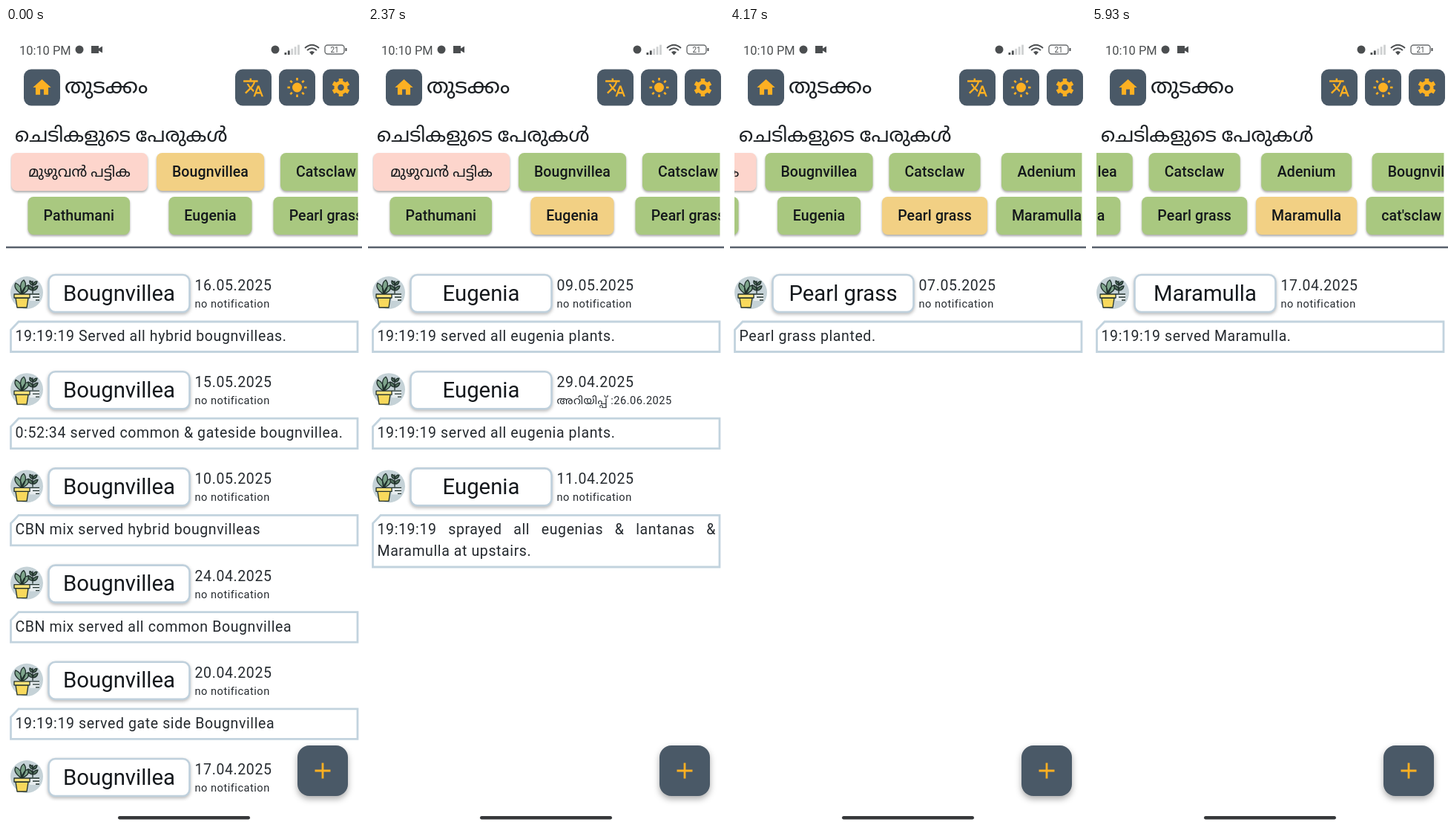
Animation of 480 by 1072 pixels, one loop 6.01 s. Source, as an HTML page:

```html
<!DOCTYPE html>
<html lang="ml">
<head>
<meta charset="utf-8">
<style>
  html, body { margin: 0; width: 100%; height: 100%; overflow: hidden; background: #fff; }
  svg { display: block; width: 480px; height: 1072px; font-family: Roboto, "Noto Sans Malayalam", "Noto Sans", sans-serif; }
  .ml { font-size: 29.3px; fill: #1c2024; }
  .chip rect { filter: drop-shadow(0 2px 1.5px #0005); }
  .chip text { font-size: 19.5px; font-weight: 500; letter-spacing: .12px; text-anchor: middle; fill: #14181b; }
  .name { font-size: 29.3px; text-anchor: middle; fill: #14181c; }
  .date { font-size: 19.5px; letter-spacing: .61px; fill: #262b30; }
  .alert { font-size: 14.65px; letter-spacing: .49px; fill: #262b30; }
  .note { font-size: 19.5px; letter-spacing: .61px; line-height: 29.3px; text-align: justify; color: #24292e; }
  .card { fill: #fff; stroke: #bfd0dc; stroke-width: 2.6; filter: drop-shadow(0 2px 2px #0004); }
  .frame { fill: #fff; stroke: #c2d3de; stroke-width: 2.8; }
  .icon { fill: #fdb022; stroke: none; }
  .line { fill: none; stroke: #fdb022; }
</style>
</head>
<body>
<svg id="stage" viewBox="0 0 480 1072">
  <defs>
    <clipPath id="strip"><rect x="6" y="160" width="468.5" height="126"/></clipPath>
    <clipPath id="list"><rect y="300" width="480" height="740"/></clipPath>
    <g id="plant" stroke="#20302c" stroke-width="1.3" stroke-linejoin="round">
      <circle r="22" fill="#c5d2d7" stroke="none"/>
      <path d="M4 2H17V11H4Z" fill="#e6ecee" stroke="none"/>
      <path d="M4 2H17M8 6H17M12 10H17" fill="none"/>
      <path d="M-7 2Q-19-6-15-13Q-6-9-7 2Q-11-13-4-17Q2-10-7 2Q-4-9 2-10Q5-3-7 2Z" fill="#7fa58c"/>
      <path d="M8 1V-16M8-3Q1-4 2-10Q8-9 8-3Q9-9 15-9Q14-3 8-3M8-10Q3-11 4-16Q8-15 8-10Q10-16 14-15Q13-10 8-10" fill="#53705f"/>
      <path d="M-15 7H2L0 20H-13Z" fill="#f8d95c"/>
      <path d="M-17 2H4V7H-17Z" fill="#fbe27a"/>
    </g>
  </defs>
  <g id="scene"></g>
</svg>
<script>
const LOOP = 6010;
const PITCH = 130.2;
const GREEN = '#a9c880', YELLOW = '#f2d084', PINK = '#fdd5cc', SLATE = '#4a5967';

// row, left edge, width, label
const chips = [
  [0, 7, 184, 'മുഴുവൻ പട്ടിക'], [0, 203, 145, 'Bougnvillea'], [0, 370, 123, 'Catsclaw'],
  [0, 521.5, 122, 'Adenium'], [0, 671, 145, 'Bougnvillea'],
  [1, 29.5, 137.5, 'Pathumani'], [1, 219.5, 112, 'Eugenia'], [1, 360.5, 142, 'Pearl grass'],
  [1, 514.5, 136, 'Maramulla'], [1, 663, 122, "cat'sclaw"],
];

const views = [
  { from: 0, chip: 1, items: [
    ['16.05.2025', '19:19:19 Served all hybrid bougnvilleas.'],
    ['15.05.2025', '0:52:34 served common &amp; gateside bougnvillea.'],
    ['10.05.2025', 'CBN mix served hybrid bougnvilleas'],
    ['24.04.2025', 'CBN mix served all common Bougnvillea'],
    ['20.04.2025', '19:19:19 served gate side Bougnvillea'],
    ['17.04.2025', ''],
  ] },
  { from: 1730, chip: 6, items: [
    ['09.05.2025', '19:19:19 served all eugenia plants.'],
    ['29.04.2025', '19:19:19 served all eugenia plants.', 'അറിയിപ്പ് :26.06.2025'],
    ['11.04.2025', '19:19:19 sprayed all eugenias &amp; lantanas &amp; Maramulla at upstairs.'],
  ] },
  { from: 3810, chip: 7, items: [['07.05.2025', 'Pearl grass planted.']] },
  { from: 5170, chip: 8, items: [['17.04.2025', '19:19:19 served Maramulla.']] },
];

const swipes = [{ from: 3290, to: 3690, by: 155.5 }, { from: 4170, to: 4590, by: 137.8 }];

const at = (x, y, body) => `<g transform="translate(${x} ${y})">${body}</g>`;
const rays = (n, r1, r2, width) => Array.from({ length: n }, (_, i) =>
  `<path class="line" stroke-width="${width}" d="M0 ${-r1}V${-r2}" transform="rotate(${i * 360 / n})"/>`).join('');
const glyph = d => `<path class="icon" transform="scale(1.22) translate(-12 -12)" d="${d}"/>`;
const button = (x, icon) => at(x, 80, `<rect x="-24.5" y="-24.5" width="49" height="49" rx="10" fill="${SLATE}"/>${icon}`);

const statusBar = `
  <g fill="#4b4e50">
    <text x="18" y="35.5" font-size="16.4">10:10 PM</text>
    <circle cx="99" cy="29" r="5.5"/>
    <path d="M115 24H125V27.500L130 24.500V33.500L125 30.500V34H115Z"/>
    <circle cx="363" cy="29" r="5.5"/>
    ${[0, 1, 2, 3, 4].map(i => `<rect x="${375.5 + i * 4.4}" y="${33 - i * 2.6}" width="2.8" height="${3 + i * 2.6}" fill="${i < 2 ? '#4b4e50' : '#cfd1d2'}"/>`).join('')}
    <path d="M409 32.500Q412.500 29.500 416 32.500L412.500 36.500Z"/>
    <path d="M403 27Q412.500 18.500 422 27M406 30Q412.500 24.500 419 30" fill="none" stroke="#4b4e50" stroke-width="2"/>
    <rect x="430" y="23" width="26" height="12" rx="3.500" fill="none" stroke="#6b6e70" stroke-width="1.400"/>
    <rect x="457.500" y="27" width="2" height="4"/>
    <text x="443" y="32.500" font-size="10" text-anchor="middle">21</text>
  </g>`;

const header = `
  ${button(48.5, glyph('M10 20v-6h4v6h5v-8h3L12 3 2 12h3v8z'))}
  ${button(333.5, glyph('M12.9 15.1l-2.6-2.5c1.800-2 3-4.200 3.800-6.600H17V4h-7V2H8v2H1v2h11.200C11.500 7.900 10.400 9.800 9 11.400 8 10.300 7.300 9.200 6.700 8h-2c.7 1.600 1.700 3.200 3 4.600l-5.100 5L4 19l5-5 3.100 3.100zM18.500 10h-2L12 22h2l1.100-3h4.800L21 22h2zm-2.600 7l1.600-4.300L19.100 17z'))}
  ${button(392.5, `<circle class="icon" r="6.500"/>${rays(8, 9.5, 13, 2.6)}`)}
  ${button(451.5, `<circle class="line" r="6.700" stroke-width="4.800"/>${rays(6, 8, 12, 5.5)}`)}
  <text class="ml" x="79" y="88">തുടക്കം</text>
  <text class="ml" x="12" y="153" style="font-size:26.800px">ചെടികളുടെ പേരുകൾ</text>
  <path d="M0 295H480" stroke="#58606b" stroke-width="2.600"/>`;

const chip = ([row, x, width, label]) => at(x, 168 + row * 59, `
  <g class="chip"><rect width="${width}" height="51" rx="7.500"/>
  <text x="${width / 2}" y="32">${label}</text></g>`);

const item = (name, [date, note, alert = 'no notification'], i) => {
  const bottom = note.length > 60 ? 725 - 2 * PITCH : 435.5;
  return at(0, i * PITCH, `
    <use href="#plant" x="28" y="356"/>
    <rect class="card" x="57.500" y="332" width="190" height="50" rx="9"/>
    <text class="name" x="152.500" y="366.500">${name}</text>
    <text class="date" x="254.500" y="353">${date}</text>
    <text class="alert" x="254.500" y="376">${alert}</text>
    ${note && `<path class="frame" d="M17 395H474V${bottom}H6.500V406Z"/>
    <foreignObject x="12.500" y="400" width="456.500" height="62"><div class="note">${note}</div></foreignObject>`}`);
};

const fab = at(427, 999, `
  <rect x="-34" y="-34" width="68" height="68" rx="16" fill="${SLATE}" style="filter:drop-shadow(0 4px 4px #0005)"/>
  <path class="line" stroke-width="2.800" d="M-10.500 0H10.500M0-10.500V10.500"/>`);

const scene = document.getElementById('scene');
scene.innerHTML = statusBar + header +
  `<g clip-path="url(#strip)"><g id="chips">${chips.map(chip).join('')}</g></g>` +
  `<g clip-path="url(#list)">${views.map(v =>
    `<g class="view">${v.items.map((it, i) => item(chips[v.chip][3], it, i)).join('')}</g>`).join('')}</g>` +
  fab + '<rect x="151" y="1060" width="178" height="4.500" rx="2.200" fill="#36383a"/>';

const strip = document.getElementById('chips');
const chipRects = strip.querySelectorAll('rect');
const viewGroups = scene.querySelectorAll('.view');
const ease = p => p < .5 ? 2 * p * p : 1 - 2 * (1 - p) ** 2;

function draw(now) {
  const t = now % LOOP;
  const current = views.findLastIndex(v => t >= v.from);
  viewGroups.forEach((g, i) => g.style.display = i === current ? '' : 'none');
  chipRects.forEach((r, i) => r.setAttribute('fill', i === 0 ? PINK : i === views[current].chip ? YELLOW : GREEN));
  const shift = swipes.reduce((sum, s) =>
    sum + s.by * ease(Math.min(1, Math.max(0, (t - s.from) / (s.to - s.from)))), 0);
  strip.setAttribute('transform', `translate(${-shift} 0)`);
  requestAnimationFrame(draw);
}
draw(performance.now());
</script>
</body>
</html>
```
